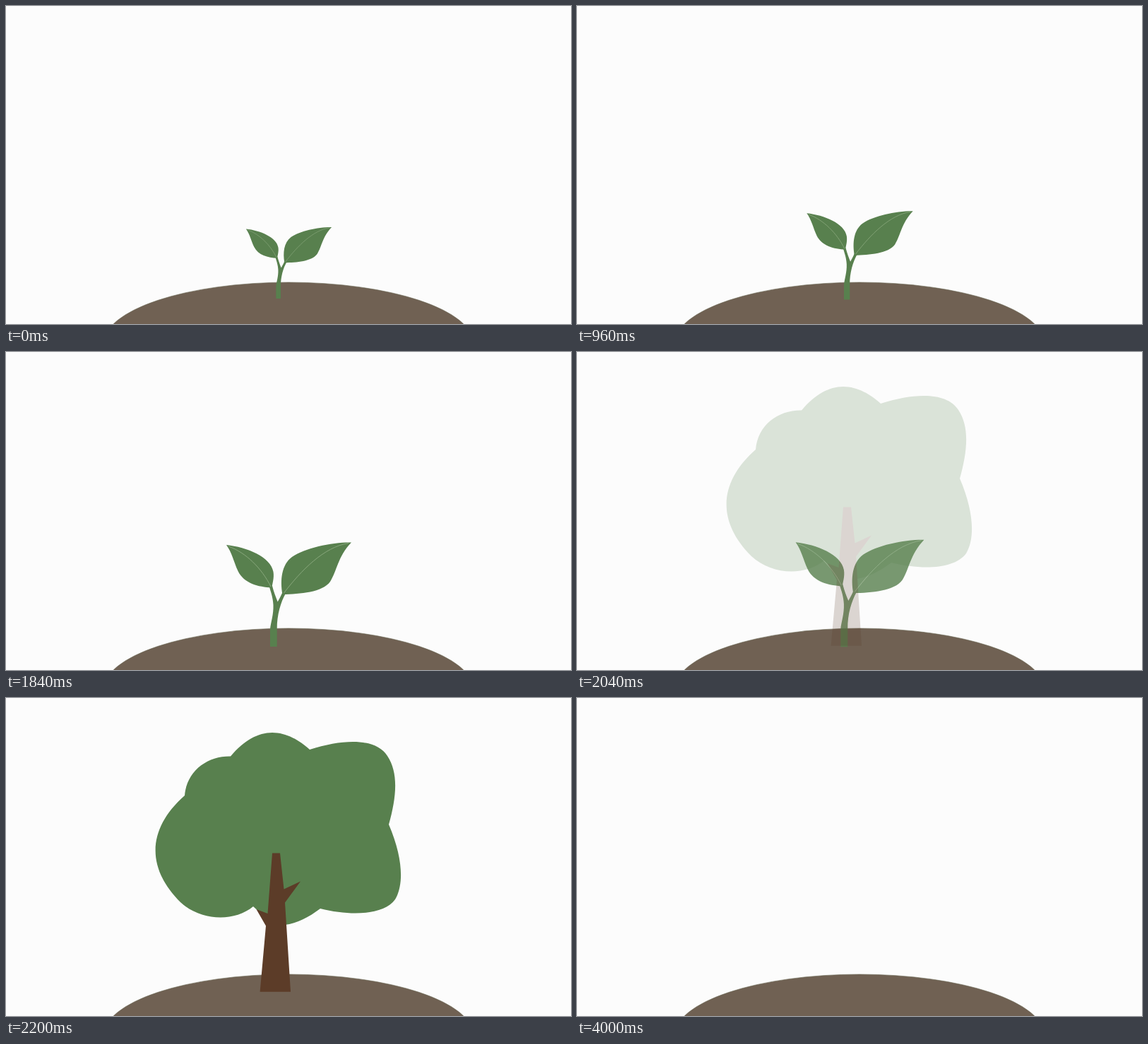
These frames come from a looping animation (800 px wide and 450 px high, 5000 ms). An HTML page:

```html
<!DOCTYPE html>
<html lang="en">
<head>
<meta charset="utf-8">
<title>Growing tree</title>
<style>
  html, body { margin: 0; width: 100%; height: 100%; overflow: hidden; background: #fcfcfc; }
  svg { display: block; width: 100%; height: 100%; }
</style>
</head>
<body>
<svg viewBox="0 0 800 450">
  <rect width="800" height="450" fill="#fcfcfc"/>
  <ellipse cx="400" cy="478.1" rx="262" ry="87.1" fill="#706153" stroke="#6b6854" stroke-width=".6"/>

  <g id="sprout" fill="#58804e">
    <path d="M374 417 V392 C375 382 379 372 378.5 358 C378 347 375 340 372.5 331
             L377 331 C379 339 382 347 384.7 353.5 C387 349 389.5 345 391.5 340
             L396 341.5 C389 354 383.5 372 383.7 392 V417Z"/>
    <path d="M312 273 C341 276 375 290 378.5 311 C380 320 377 328 376.5 333.5
             C357 332.5 337 327.5 328.5 310 C322.5 297 320 284 312 273Z"/>
    <path d="M489 269.5 C462 269 424 277 405 290 C390 301 388 323 391.5 343
             C417 342.5 448 340 459 325 C469 309 469.5 290 489 269.5Z"/>
    <g fill="none" stroke="#8dab80" stroke-width=".9">
      <path d="M315 275 C340 284 362 306 375 332"/>
      <path d="M393.5 341 C418 309 450 276 485 270.5"/>
    </g>
  </g>

  <g id="tree">
    <path id="crown" fill="#58804e" d="M253 138 C256 103 285 82 318 82.5
             C337 60 357 49 377 49 C397 49 416 60 430 73
             C480 57 524 57 540 82 C556 106 553 140 542 179
             C563 228 563 265 551 285 C535 307 489 309 445 298
             C429 310 412 319 395 321 C378 318 363 307 350 295
             C322 318 275 315 247 289 C196 238 202 183 253 138Z"/>
    <path id="trunk" fill="#5c3c28" d="M377 218 H388 L393.5 269 L417 258 L395 288
             L403 414.3 H359.6 L368 321 L354.5 297.5 L370.5 303.5Z"/>
  </g>
</svg>
<script>
  const LOOP = 5000, STEP = 40;
  const GROW_END = 2000, FADE_END = 2200, CROWN_END = 3000, TREE_END = 4000;
  const DRAWN_SCALE = 1.46, ROOT = [400.5, 407.5];
  const [sprout, tree, crown, trunk] =
    ['sprout', 'tree', 'crown', 'trunk'].map(id => document.getElementById(id));

  const clamp = v => Math.min(1, Math.max(0, v));
  const show = (el, opacity) => {
    el.setAttribute('opacity', opacity);
    el.setAttribute('display', opacity > 0 ? 'inline' : 'none');
  };

  function draw(t) {
    const scale = (1 + 0.5 * clamp(t / GROW_END)) / DRAWN_SCALE;
    const fade = clamp((t - GROW_END) / (FADE_END - GROW_END));
    const [x, y] = ROOT;
    sprout.setAttribute('transform',
      `translate(${x} ${y}) scale(${scale}) translate(${-x} ${-y})`);
    show(sprout, 1 - fade);
    show(tree, t < TREE_END ? fade : 0);
    show(crown, t < CROWN_END ? 1 : 0);
    // The bare trunk stands slightly higher than the leafy one.
    trunk.setAttribute('transform', `translate(0 ${t < CROWN_END ? 1.5 : 0})`);
  }

  const start = performance.now();
  function tick() {
    const t = (performance.now() - start) % LOOP;
    draw(Math.floor(t / STEP) * STEP);
    requestAnimationFrame(tick);
  }
  tick();
</script>
</body>
</html>
```
